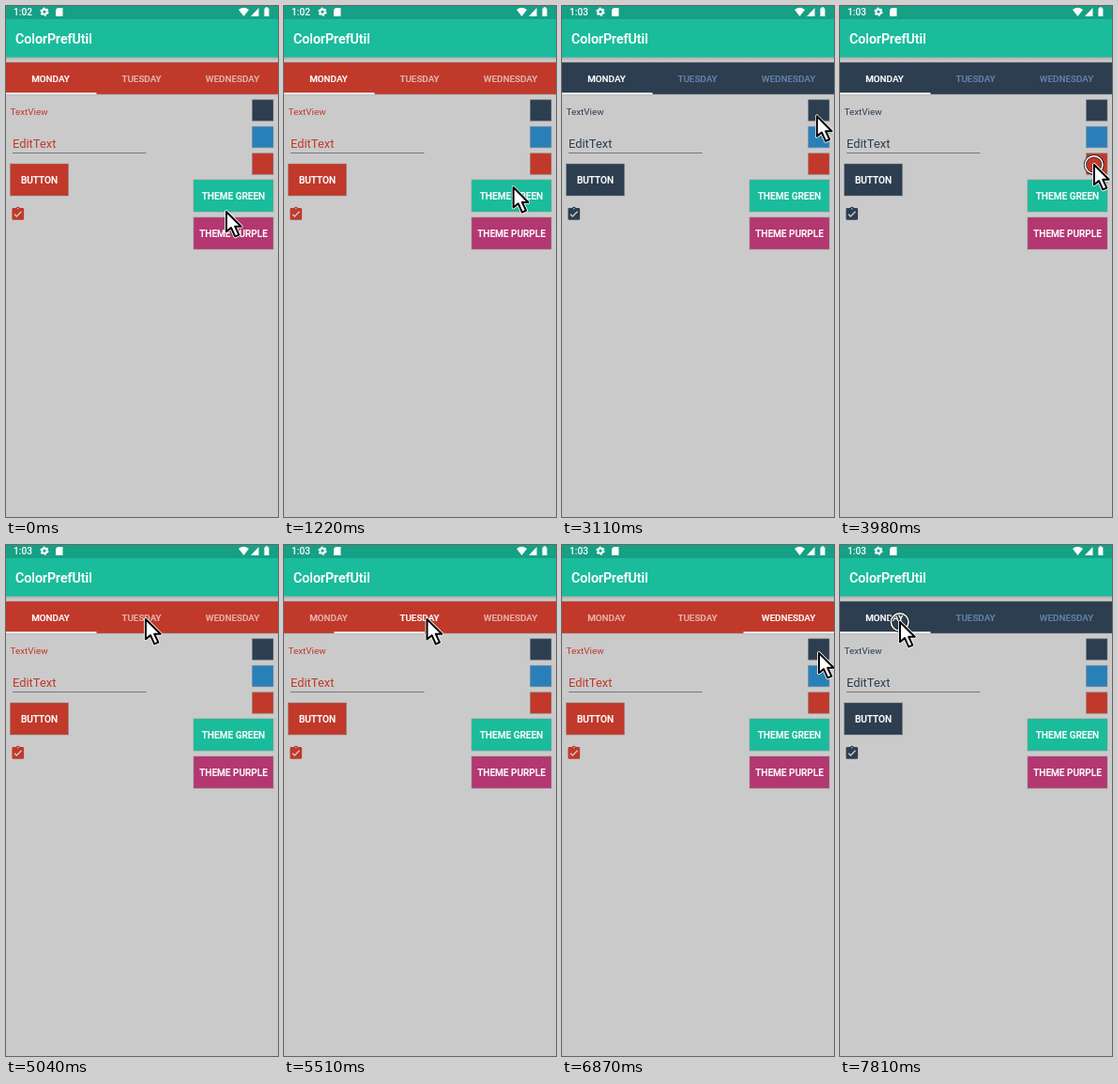
These frames come from a looping animation (290 px wide and 544 px high, 8 s). An HTML page:

```html
<!DOCTYPE html>
<html lang="en">
<head>
<meta charset="utf-8">
<title>ColorPrefUtil</title>
<style>
  html, body { margin: 0; width: 100%; height: 100%; overflow: hidden; background: #cacaca; }
  svg { display: block; width: 290px; height: 544px; font-family: Roboto, sans-serif; font-size: 9.87px; }
  .accent { fill: var(--accent); }
  .label { font-weight: 500; color: #fff; fill: currentColor; stroke: currentColor; stroke-width: .2; text-anchor: middle; }
  .button { font-size: 10.05px; }
  .raised { stroke: #9997; stroke-width: .8; filter: drop-shadow(0 .6px .5px #0004); }
</style>
</head>
<body>
<svg id="stage" viewBox="0 0 290 544">
  <defs>
    <linearGradient id="shade" x2="0" y2="1">
      <stop stop-color="#a5a9a8"/><stop offset="1" stop-color="#cacaca"/>
    </linearGradient>
  </defs>
  <rect width="290" height="544" fill="#cacaca"/>
  <rect y="54" width="290" height="4" fill="url(#shade)"/>
  <rect id="bar" y="14" width="290" height="40.5"/>
  <rect id="status" width="290" height="14"/>

  <g fill="#fff">
    <text id="clock" x="8" y="10" font-size="10.2" font-weight="500"></text>
    <circle cx="41" cy="6.2" r="2.6" fill="none" stroke="#fff" stroke-width="2"/>
    <circle cx="41" cy="6.2" r="4" fill="none" stroke="#fff" stroke-width="1.3" stroke-dasharray="2.1 2.09"/>
    <path d="M55 2h5.5v9H53V4z"/>
    <path d="M248 4Q253.5 -.5 259 4L253.5 11z"/>
    <path d="M269.5 2V11H261z"/>
    <path d="M276.7 1.3h2.4v1.1h1.3V11h-5V2.4h1.3z"/>
  </g>
  <text class="label" x="10" y="40" style="font-size:14.2px;text-anchor:start">ColorPrefUtil</text>

  <rect class="accent raised" x="-1" y="60" width="292" height="34"/>
  <g id="tabs"></g>
  <rect id="line" y="92.3" width="96.5" height="1.7" fill="#fff"/>

  <text class="accent" x="4.5" y="116">TextView</text>
  <text class="accent" x="7" y="151" font-size="12.9">EditText</text>
  <path d="M7 156.5H149.5" stroke="#777"/>
  <path class="accent" transform="translate(4.3 213) scale(.705)" d="M19 3h-4.2a3 3 0 0 0-5.6 0H5a2 2 0 0 0-2 2v14a2 2 0 0 0 2 2h14a2 2 0 0 0 2-2V5a2 2 0 0 0-2-2zm-7 0a1 1 0 0 1 0 2 1 1 0 0 1 0-2zm-2 14l-4-4 1.4-1.4 2.6 2.6 6.6-6.6L18 9z"/>
  <g id="widgets"></g>

  <g id="pointer">
    <g id="ring" fill="none">
      <circle cx=".7" cy="1" r="9.3" stroke="#222" stroke-width="3"/>
      <circle cx=".7" cy="1" r="9.3" stroke="#fff" stroke-width="1.5"/>
    </g>
    <g transform="scale(.93)" stroke-linejoin="round">
      <path id="arrow" d="M1 1V24L6.5 19.5L11 29.5L15.5 27.5L11 18H18Z" fill="none" stroke="#fff" stroke-width="3.6"/>
      <use href="#arrow" style="fill:#fff"/>
      <path d="M1 1V24L6.5 19.5L11 29.5L15.5 27.5L11 18H18Z" fill="#fff" stroke="#000" stroke-width="2.2"/>
    </g>
  </g>
</svg>
<script>
const LOOP = 8000;
const $ = id => document.getElementById(id);
const red = '#c0392b', dark = '#2c3e50';
const green = ['#1abc9c', '#16a085'], purple = ['#b33771', '#6d214f'];

const box = (x, y, w, h, fill) =>
  `<rect class="raised ${fill ? '' : 'accent'}" x="${x}" y="${y}" width="${w}" height="${h}" ${fill ? `fill="${fill}"` : ''}/>`;
const label = (x, y, text, type = '') => `<text class="label ${type}" x="${x}" y="${y}">${text}</text>`;
const button = (x, y, w, text, fill) => box(x, y, w, 34, fill) + label(x + w / 2, y + 21, text, 'button');

$('tabs').innerHTML = ['MONDAY', 'TUESDAY', 'WEDNESDAY'].map((day, i) => label(47.5 + 97 * i, 81, day)).join('');
$('widgets').innerHTML = [dark, '#2980b9', red].map((c, i) => box(262.5, 99.8 + 28.5 * i, 22.5, 22.5, c)).join('')
  + button(4.5, 168, 62, 'BUTTON')
  + button(200, 185, 85, 'THEME GREEN', green[0])
  + button(200, 225, 85, 'THEME PURPLE', purple[0]);

// The pointer reaches each stop at `at`, may press, and leaves at `end`, when `set` takes effect.
const stops = [
  { x: 234, y: 218, at: 0, end: 0 },
  { x: 238, y: 204, at: 60, end: 60, set: { theme: purple } },
  { x: 238, y: 204, at: 60, press: 800, end: 980, set: { theme: green } },
  { x: 272, y: 133, at: 1910, end: 2150 },
  { x: 271, y: 109, at: 2260, press: 2750, end: 3060, set: { accent: dark } },
  { x: 270, y: 168, at: 3290, press: 3980, end: 4160, set: { accent: red } },
  { x: 148, y: 78, at: 4920, press: 5280, end: 5420, set: { tab: 1 } },
  { x: 223, y: 79, at: 6110, press: 6250, end: 6400, set: { tab: 2 } },
  { x: 273, y: 114, at: 6870, press: 6980, end: 7150, set: { accent: dark } },
  { x: 63, y: 81, at: 7580, press: 7580, end: 7630, set: { tab: 0 } },
  { x: 63, y: 81, at: 7630, press: 7630, end: LOOP }
];

const clamp = p => Math.max(0, Math.min(1, p));
const ease = p => p * p * (3 - 2 * p);
const mix = (a, b, p) => a + (b - a) * p;

function stateAt(t) {
  const state = { theme: green, accent: red, tab: 0, line: 0 };
  for (const { end, set } of stops) {
    if (!set || end > t) continue;
    Object.assign(state, set);
    state.line = mix(state.line, state.tab, ease(clamp((t - end) / 170)));
  }
  return state;
}

function draw(t) {
  const { theme, accent, tab, line } = stateAt(t);
  const i = stops.findIndex(s => s.end > t);
  const from = stops[i - 1], to = stops[i];
  const p = to.at > from.end ? ease(clamp((t - from.end) / (to.at - from.end))) : 1;

  $('stage').style.setProperty('--accent', accent);
  $('bar').setAttribute('fill', theme[0]);
  $('status').setAttribute('fill', theme[1]);
  $('clock').textContent = t < 2750 ? '1:02' : '1:03';
  $('line').setAttribute('x', line * 96.75);
  [...$('tabs').children].forEach((el, n) => {
    el.style.color = n === tab ? '#fff' : accent === red ? '#e6b5af' : '#6482a8';
  });
  $('pointer').setAttribute('transform', `translate(${mix(from.x, to.x, p)} ${mix(from.y, to.y, p)})`);
  $('ring').style.display = t >= to.press ? '' : 'none';
}

function frame() {
  draw(performance.now() % LOOP);
  requestAnimationFrame(frame);
}
frame();
</script>
</body>
</html>
```
